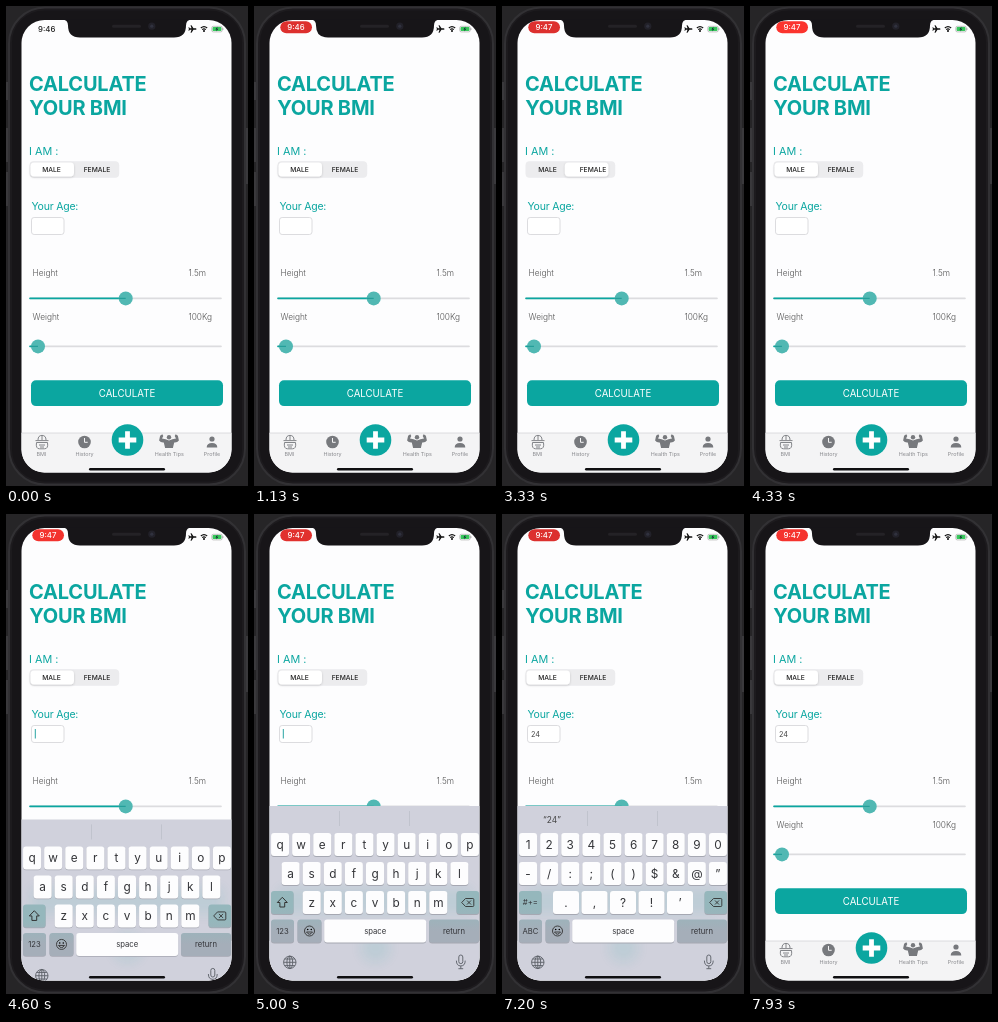
These frames come from a looping animation (242 by 480 pixels, 8 s). An HTML page:

```html
<!DOCTYPE html>
<html lang="en">
<head>
<meta charset="utf-8">
<title>BMI calculator</title>
<style>
  html, body { margin: 0; width: 100%; height: 100%; overflow: hidden; background: #000; }
  svg { display: block; width: 242px; height: 480px; }
  text { font-family: Inter, "Open Sans", sans-serif; }
  .teal { fill: #0ba6a0; }
  .title { font-size: 20px; font-weight: 700; letter-spacing: -.2px; }
  .label { font-size: 8.3px; font-weight: 300; fill: #555; }
  .mid { text-anchor: middle; }
  .tab { font-size: 5.4px; fill: #88898d; }
  .key { font-size: 11.8px; fill: #333438; }
  .small { font-size: 7.7px; fill: #333438; }
  .clock { font-size: 7.8px; font-weight: 500; }
</style>
</head>
<body>
<svg viewBox="0 0 242 480" xmlns="http://www.w3.org/2000/svg">
  <defs>
    <clipPath id="screen"><rect x="15.5" y="14" width="210" height="452.4" rx="23"/></clipPath>
    <clipPath id="panelClip"><rect id="panelArea" x="15" y="467" width="212" height="180"/></clipPath>
    <linearGradient id="darkKey" gradientUnits="userSpaceOnUse" x1="0" y1="377" x2="0" y2="417">
      <stop offset=".4" stop-color="#95b7bc"/><stop offset="1" stop-color="#a5aeb9"/>
    </linearGradient>
    <filter id="blur" x="-20%" y="-100%" width="140%" height="300%"><feGaussianBlur stdDeviation="6"/></filter>
    <filter id="lift" x="-20%" y="-30%" width="140%" height="180%">
      <feDropShadow dx="0" dy=".8" stdDeviation=".8" flood-opacity=".18"/>
    </filter>
  </defs>

  <!-- phone body -->
  <rect width="242" height="480" fill="#262527"/>
  <path d="M1 76v18M1 122v34M1 166v34M241 122v56" stroke="#3a393c" stroke-width="2"/>
  <rect x="3" y="1.5" width="236" height="477" rx="36" fill="#1d1b1e" stroke="#323134" stroke-width="2"/>
  <rect x="6" y="4.5" width="230" height="471" rx="32" fill="#171518"/>

  <g clip-path="url(#screen)">
    <rect x="15" y="14" width="212" height="454" fill="#fdfdfe"/>

    <!-- status bar -->
    <rect id="pill" x="26.3" y="15.3" width="31.7" height="12" rx="6"/>
    <text id="clock" class="clock mid"></text>
    <g id="record" fill="none" stroke="#fff">
      <circle cx="42" cy="21.2" r="4.1"/><circle cx="42" cy="21.2" r="2.2" fill="#fff" stroke="none"/>
    </g>
    <path d="M190.5 23c0-.6-.6-.8-1.2-.8h-1.8l-2-2.9h-1l1 2.9h-1.6l-.8-1h-.7l.5 1.8-.5 1.8h.7l.8-1h1.6l-1 2.9h1l2-2.9h1.8c.6 0 1.2-.2 1.2-.8z" fill="#111"/>
    <g fill="none" stroke="#111" stroke-width="1.1">
      <path d="M194.8 22q3.2-2.7 6.4 0M196.2 23.6q1.8-1.5 3.6 0"/><circle cx="198" cy="25" r=".5"/>
    </g>
    <rect x="205.8" y="20.3" width="10.4" height="5.6" rx="1.5" fill="none" stroke="#999" stroke-width=".6"/>
    <rect x="206.6" y="21.1" width="8.8" height="4" rx=".8" fill="#38c75c"/>
    <path d="M216.9 22.2v1.8" stroke="#999" stroke-width=".8"/>
    <path d="M211.6 20.6l-2.2 2.8h1.4l-.6 2.2 2.2-2.9h-1.4z" fill="#123"/>

    <!-- form -->
    <text class="teal title" x="23" y="85">CALCULATE</text>
    <text class="teal title" x="23.2" y="109.2">YOUR BMI</text>
    <text class="teal" x="23" y="149" font-size="10.8">I AM :</text>
    <rect x="23.5" y="155.3" width="89.7" height="16.4" rx="4" fill="#ececee"/>
    <rect id="choice" y="156.6" width="43.5" height="13.8" rx="3.6" fill="#fff" filter="url(#lift)"/>
    <g class="mid" font-size="6.7" font-weight="500" fill="#222">
      <text x="45.5" y="166">MALE</text><text x="91" y="166">FEMALE</text>
    </g>
    <text class="teal" x="25.5" y="204.4" font-size="10.5" letter-spacing="-.22">Your Age:</text>
    <rect x="25.5" y="211.5" width="32.5" height="17" rx="2.6" fill="#fff" stroke="#d9d9dc" stroke-width=".9"/>
    <text id="age" x="28.9" y="222.8" font-size="7.3" fill="#444"></text>
    <rect id="caret" y="215" width="1" height="9.5" fill="#2aa5a4"/>
    <text class="label" x="26.6" y="270.4">Height</text>
    <text class="label" x="182.4" y="270.4">1.5m</text>
    <text class="label" x="26.6" y="314.4">Weight</text>
    <text class="label" x="182.4" y="314.4">100Kg</text>
    <g id="sliders"></g>
    <rect x="25" y="374.3" width="192" height="25.8" rx="5" class="teal"/>
    <text class="mid" x="121" y="390.7" font-size="9.7" fill="#fff">CALCULATE</text>

    <!-- tab bar -->
    <rect x="15" y="427" width="212" height="41" fill="#f4f4f5"/>
    <path d="M15 427h212" stroke="#cfcfd2" stroke-width=".7"/>
    <g fill="none" stroke="#77797d" stroke-width=".9">
      <path d="M29.5 434.6h13M30.5 436.5q-1 6.3 3 6.3h5q4 0 3-6.3zM32 434q0-4.6 4-4.6t4 4.6M36 430v4M33 439h6M34 441h4"/>
    </g>
    <g fill="#77797d">
      <circle cx="78.5" cy="436" r="6.3"/>
      <circle cx="206" cy="433" r="2.6"/>
      <path d="M200.7 441.5q0-4.6 5.3-4.6t5.3 4.6z"/>
      <circle cx="163" cy="431.3" r="2.2"/>
      <path d="M156.3 428.2l-2.2 1.6-1 4.6q1.6 2.3 4.7 2l1.3 5.6h7.8l1.3-5.6q3.1.3 4.7-2l-1-4.6-2.2-1.6-1 1.7 1.3 2.6q-3.6.6-7 2-3.4-1.4-7-2l1.3-2.6z"/>
    </g>
    <path d="M78.5 432v4.3h3.2" fill="none" stroke="#f4f4f5"/>
    <g class="tab mid">
      <text x="35.5" y="450.3">BMI</text><text x="78.5" y="450.3">History</text>
      <text x="163.3" y="450.3">Health Tips</text><text x="206" y="450.3">Profile</text>
    </g>
    <circle cx="121.5" cy="434" r="15.8" class="teal"/>
    <path d="M112.7 434h17.6M121.5 425.2v17.6" stroke="#fff" stroke-width="4.8"/>

    <!-- keyboard: frosted panel stays aligned with the page, keys slide over it -->
    <g clip-path="url(#panelClip)">
      <rect x="15" y="285" width="212" height="185" fill="#d0d1dc"/>
      <g filter="url(#blur)" class="teal" opacity=".09">
        <rect x="25" y="374" width="192" height="26"/><circle cx="121.5" cy="434" r="15"/>
      </g>
    </g>
    <g id="keyboard">
      <path d="M85.5 297v15M155.5 297v15" stroke="#bcbfc9" stroke-width=".8"/>
      <text id="hint" class="mid" x="50" y="308.6" font-size="8.4" fill="#444"></text>
      <g id="letters"></g>
      <g id="digits"></g>
      <g id="common"></g>
      <g fill="none" stroke="#5a5e66" stroke-width=".9">
        <circle cx="35.8" cy="448.3" r="6.2"/><ellipse cx="35.8" cy="448.3" rx="2.9" ry="6.2"/>
        <path d="M29.6 448.3h12.4M35.8 442v12.6M30.7 445h10.2M30.7 451.6h10.2"/>
        <rect x="204.8" y="441" width="4" height="8.6" rx="2"/>
        <path d="M202.4 446.6q0 5.3 4.4 5.3t4.4-5.3M206.8 452v2.6M204.4 454.7h4.8"/>
      </g>
    </g>
    <rect x="83" y="462" width="76" height="2.5" rx="1.2" fill="#0f0f11"/>
  </g>

  <!-- notch -->
  <path d="M56 13.5q6 0 6 6 0 12 12 12h94q12 0 12-12 0-6 6-6z" fill="#171518"/>
  <rect x="106" y="18.8" width="29" height="3" rx="1.5" fill="#242226"/>
  <circle cx="145.8" cy="20.2" r="3.6" fill="#222129"/><circle cx="145.8" cy="20.2" r="1.6" fill="#30313e"/>
</svg>

<script>
const LOOP = 8000;
const $ = id => document.getElementById(id);

const slider = (y, x) => `
  <path d="M24 ${y}H215" stroke="#dcdcdf" stroke-width="1.6" stroke-linecap="round"/>
  <path d="M24 ${y}H${x}" stroke="#0ba6a0" stroke-width="1.6" stroke-linecap="round"/>
  <circle cx="${x}" cy="${y}" r="7" fill="#51b8b3"/>
  <path d="M${x - 7} ${y}H${x}" stroke="#259f9a" stroke-width="1.4"/>`;

const cap = (cx, cy, width, label = '', dark = false, cls = 'key') => {
  const box = (dy, fill) => `<rect x="${cx - width / 2}" y="${cy - 11.5 + dy}" width="${width}" height="23" rx="3" fill="${fill}"/>`;
  const face = box(.9, '#a6a8b2') + box(0, dark ? 'url(#darkKey)' : '#fdfdfe');
  return `${face}<text class="mid ${cls}" x="${cx}" y="${cy + (cls === 'key' ? 4 : 2.8)}">${label}</text>`;
};

const row = (chars, y, pitch = 21.1, width = 18) =>
  [...chars].map((c, i, all) => cap(121 + (i - (all.length - 1) / 2) * pitch, y, width, c.replace('&', '&amp;'))).join('');

$('sliders').innerHTML = slider(292.4, 119.7) + slider(340.4, 32);

$('letters').innerHTML = row('qwertyuiop', 330.5) + row('asdfghjkl', 359.5) + row('zxcvbnm', 388.5) +
  cap(28.3, 388.5, 22.6, '', true) + cap(28.5, 417, 23, '123', true, 'small') +
  '<path d="M28.3 383.3l5 5.2h-2.6v4.5h-4.8v-4.5h-2.6z" fill="none" stroke="#333"/>';

$('digits').innerHTML = row('1234567890', 330.5) + row('-/:;()$&@”', 359.5) + row('.,?!’', 388.5, 28.5, 26) +
  cap(28.3, 388.5, 22.6, '#+=', true, 'small') + cap(28.5, 417, 23, 'ABC', true, 'small');

$('common').innerHTML = cap(213.8, 388.5, 22.6, '', true) + cap(55.5, 417, 24, '', true) +
  cap(121.2, 417, 102, 'space', false, 'small') + cap(200, 417, 50, 'return', true, 'small') + `
  <g fill="none" stroke="#333" stroke-width=".9">
    <path d="M207.7 388.5l3.8-4h7.3q1 0 1 1v6q0 1-1 1h-7.3zM213 386.5l4 4M217 386.5l-4 4"/>
    <circle cx="55.5" cy="417" r="5"/><path d="M52.5 418q3 4.4 6 0z"/>
  </g>
  <circle cx="53.7" cy="415.5" r=".8"/><circle cx="57.3" cy="415.5" r=".8"/>`;

// critically damped spring, 0 to 1
const spring = ms => {
  const x = Math.max(0, ms) * .02;
  return 1 - (1 + x) * Math.exp(-x);
};
const between = (t, from, to) => t >= from && t < to;
const show = (id, on) => $(id).setAttribute('display', on ? 'inline' : 'none');

const AGE = [[0, '', ''], [5900, '2', '“2”'], [6400, '24', '“2”'], [6500, '24', '“24”']];

function render(t) {
  const recording = t >= 600;
  const icon = between(t, 1500, 3300);
  const glow = (1 + Math.cos((t - 4250) / 2000 * 2 * Math.PI)) / 2;
  show('pill', recording);
  show('record', icon);
  show('clock', !icon);
  $('pill').setAttribute('fill', `rgb(${220 + 32 * glow},${48 + 4 * glow},46)`);
  const clock = $('clock');
  clock.textContent = t < 3300 ? '9:46' : '9:47';
  clock.setAttribute('x', recording ? 42 : 40.7);
  clock.setAttribute('y', recording ? 24.1 : 26);
  clock.setAttribute('fill', recording ? '#fff' : '#222');

  const female = spring(t - 2120) - spring(t - 3300);
  $('choice').setAttribute('x', 24.5 + 44 * female);

  const [, age, hint] = AGE.findLast(step => t >= step[0]);
  $('age').textContent = age;
  $('hint').textContent = hint;
  $('caret').setAttribute('x', 28.8 + age.length * 4.5);
  show('caret', between(t, 4390, 7250) && !between(t, 5150, 5600) && !between(t, 6950, 7250));

  const up = spring(t - 4390) - spring(t - 7250);
  const drop = 175 * (1 - up);
  show('keyboard', up > .001);
  $('keyboard').setAttribute('transform', `translate(0 ${drop})`);
  $('panelArea').setAttribute('y', 292 + drop);
  show('letters', t < 5450);
  show('digits', t >= 5450);
}

const start = performance.now();
(function frame() {
  render((performance.now() - start) % LOOP);
  requestAnimationFrame(frame);
})();
</script>
</body>
</html>
```
